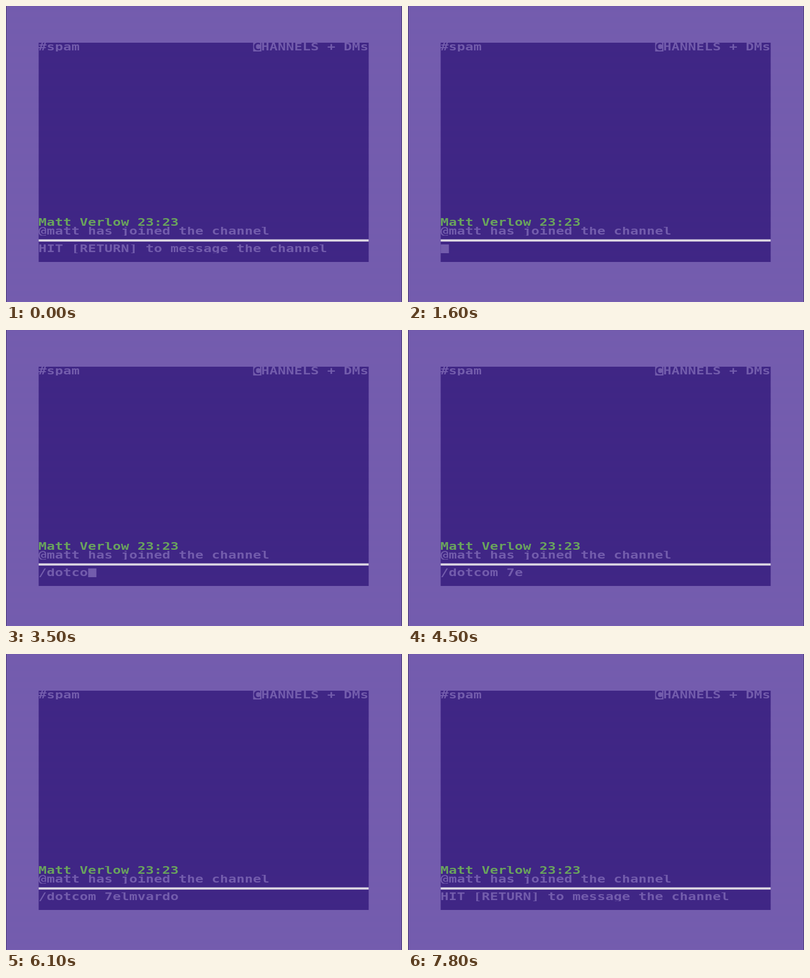
Write an HTML page with a canvas that moves like this. It is 720 by 540 pixels and loops after 8 s.

```html
<!DOCTYPE html>
<html lang="en">
<head>
<meta charset="utf-8">
<title>Retro chat</title>
<style>
  html, body { margin: 0; width: 100%; height: 100%; overflow: hidden; background: #7f65bf; }
  canvas { display: block; }
</style>
</head>
<body>
<canvas id="stage" width="720" height="540"></canvas>
<script>
const ctx = document.getElementById('stage').getContext('2d');
const LOOP = 8000, BLINK = 1000 / 3;
const LEFT = 59.4, TOP = 67, CELL_W = 15, CELL_H = 16, COLS = 40, ROWS = 25;
const PIXEL_ASPECT = 1.3;
const BORDER = '#7f65bf', SCREEN = '#462a92', INK = '#7e65bd', GREEN = '#74b466', WHITE = '#f4eefa';

const COMMAND = '/dotcom 7elmvardop.com';
const INPUT_START = 1200, INPUT_END = 7500;
const keyTimes = [2100, 2600, 2800, 3000, 3200, 3400, 3700, 3900, 4200, 4500, 4700,
  4900, 5100, 5300, 5500, 5700, 6100, 6300, 6500, 6650, 6750, 7000];

function rect(x, y, w, h, color) {
  ctx.fillStyle = color;
  ctx.fillRect(x, y, w, h);
}

function block(col, row) {
  rect(LEFT + col * CELL_W, TOP + row * CELL_H, CELL_W, CELL_H, INK);
}

// One character per cell; the pixels of this display are wider than tall.
function print(text, col, row, color = INK) {
  ctx.save();
  ctx.beginPath();
  ctx.rect(0, TOP + row * CELL_H, 720, CELL_H);
  ctx.clip();
  ctx.translate(LEFT + (col + 0.5) * CELL_W - 0.5, TOP + row * CELL_H + 14.3);
  ctx.scale(PIXEL_ASPECT, 1);
  ctx.fillStyle = color;
  [...text].forEach((ch, i) => ctx.fillText(ch, i * CELL_W / PIXEL_ASPECT, 0));
  ctx.restore();
}

function drawInput(t) {
  if (t < INPUT_START || t >= INPUT_END) {
    print('HIT [RETURN] to message the channel', 0, 23);
    return;
  }
  const typed = keyTimes.filter(time => time <= t).length;
  print(COMMAND.slice(0, typed), 0, 23);
  const phase = (t - 150 + 2 * BLINK) % (2 * BLINK);
  if (phase < BLINK) block(typed, 23);
}

function draw(t) {
  rect(0, 0, 720, 540, BORDER);

  ctx.filter = 'blur(0.5px)';
  rect(LEFT, TOP, COLS * CELL_W, ROWS * CELL_H, SCREEN);
  print('#spam', 0, 0);
  block(26, 0);
  print('C', 26, 0, SCREEN);
  print('HANNELS + DMs', 27, 0);
  print('Matt Verlow 23:23', 0, 20, GREEN);
  print('@matt has joined the channel', 0, 21);
  rect(LEFT, 425.7, COLS * CELL_W, 4, WHITE);
  drawInput(t);
  ctx.filter = 'none';

  for (let y = 0; y < 540; y += 2) rect(0, y, 720, 1, 'rgba(0,0,0,.18)');
  for (const x of [0, 719]) rect(x, 0, 1, 540, 'rgba(20,10,50,.5)');
}

ctx.font = 'bold 19px "DejaVu Sans Mono", monospace';
ctx.textAlign = 'center';

function frame() {
  draw(performance.now() % LOOP);
  requestAnimationFrame(frame);
}
frame();
</script>
</body>
</html>
```
